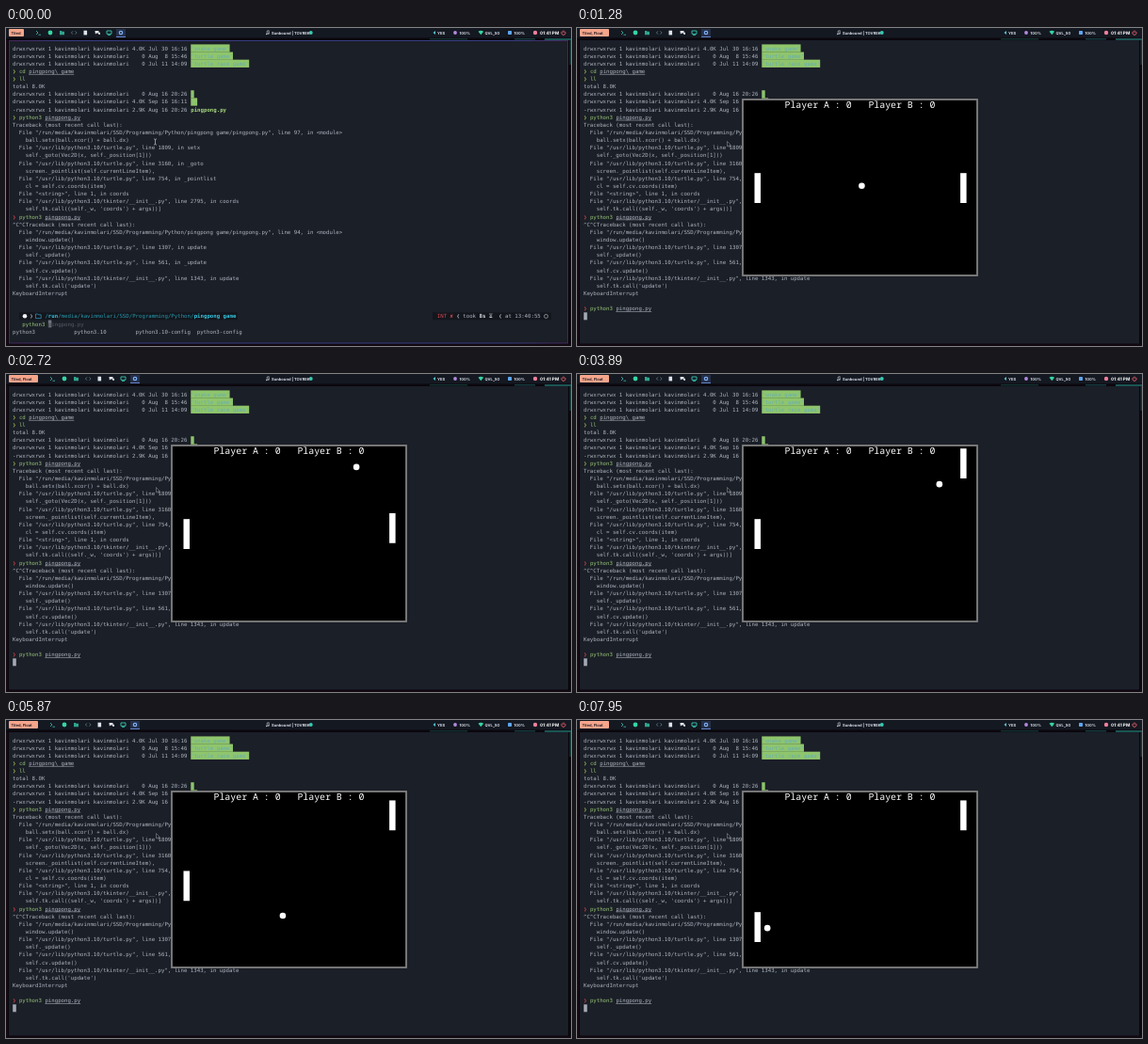
Write an HTML page that moves like this. It is 600x338 px and loops after 8 s.

```html
<!DOCTYPE html>
<html lang="en">
<head>
<meta charset="utf-8">
<title>Ping pong in a terminal</title>
<style>
html, body { margin: 0; width: 100%; height: 100%; overflow: hidden; background: #0a070d; }
svg { display: block; width: 600px; height: 338px; }
text { white-space: pre; text-rendering: geometricPrecision; font: 5.716px "DejaVu Sans Mono", monospace; }
.bar text { font: bold 4.1px Inter, sans-serif; fill: #d5dbe6; }
.bar .clock { font-size: 4.7px; fill: #fff; }
.score { font: 9.9px "Noto Sans Mono", "DejaVu Sans Mono", monospace; fill: #fff; }
.bold { font-weight: bold; }
.under { text-decoration: underline; }
</style>
</head>
<body>
<svg id="stage" viewBox="0 0 600 338" xmlns="http://www.w3.org/2000/svg">
  <linearGradient id="focusRing">
    <stop offset="0" stop-color="#44265a"/>
    <stop offset=".1" stop-color="#383e82"/>
    <stop offset=".9" stop-color="#383e82"/>
    <stop offset="1" stop-color="#44265a"/>
  </linearGradient>
  <rect width="600" height="338" fill="#0a070d"/>
  <g id="wallpaper"></g>
  <rect width="600" height="10.5" fill="#141821"/>
  <g class="bar">
    <rect id="pill" x="3" y="1" height="8" rx="1" fill="#f5a58c"/>
    <text id="layout" x="5.500" y="6.600" style="fill:#33252a"></text>
    <g id="icons" fill="none" stroke-width=".9">
      <path d="M32 3l2 2-2 2M34.500 7.200h2.500" stroke="#3fae9f"/>
      <circle cx="47" cy="5" r="2.400" fill="#35d6a4"/>
      <path d="M57 3h2l.7.8h2.300v3.400h-5z" fill="#2fa58e"/>
      <path d="M71 3.300l-1.600 1.700 1.600 1.700M73.500 3.300l1.600 1.700-1.600 1.700" stroke="#59737b"/>
      <path d="M82.500 2.700h3.600v4.700h-3.600z" fill="#dfe5ec"/>
      <path d="M94.500 3h4v2.600h-2.400l-1.200 1z M98 4.700h2v2.200l-2-.4z" fill="#e6ebf2"/>
      <path d="M107 3h5v3.300h-5zM108 7.400h3" stroke="#38c9b1"/>
      <rect x="117" y="1" width="10" height="8" fill="#25304a"/>
      <path d="M117 9.500h10" stroke="#6c8fe0"/>
      <circle cx="122" cy="5" r="1.700" stroke="#7fb2f5" stroke-width="1.200"/>
    </g>
    <path d="M277.200 6.600v-3.400l2-.5v3.300" fill="none" stroke="#d5dbe6" stroke-width=".6"/>
    <circle cx="276.800" cy="6.500" r=".7" fill="#d5dbe6"/>
    <circle cx="278.800" cy="6" r=".7" fill="#d5dbe6"/>
    <text x="282" y="6.600">Sunbound | TOVREK</text>
    <circle cx="323.800" cy="5" r="1.900" fill="#36cdb5"/>
    <path d="M456 3v4l-2.500-2z" fill="#52c5d0"/>
    <text x="458" y="6.600">YES</text>
    <circle cx="477" cy="5" r="1.900" fill="#b48ae0"/>
    <text x="481.500" y="6.600">100%</text>
    <path d="M501.500 3.700q2.800-2 5.600 0l-2.800 3.500z" fill="#35d6a4"/>
    <text x="508.500" y="6.600">QVL_5G</text>
    <rect x="533" y="3" width="4" height="4" rx=".7" fill="#5ea6ef"/>
    <text x="539.500" y="6.600">100%</text>
    <circle cx="562" cy="5" r="2.200" fill="#ef7f9b"/>
    <text class="clock" x="567" y="6.700">01:41 PM</text>
    <path d="M590.700 3.600a2.100 2.100 0 1 0 2.600 0M592 2.500v2.500" fill="none" stroke="#f0626f" stroke-width=".9"/>
  </g>
  <rect id="terminal" x="3.500" y="13.500" width="593" height="321.500" fill="#1b1f27"/>
  <g id="history"></g>
  <g id="prompt">
    <path d="M14 302.300h232v8h-232zM453 302.300h126v8h-126z" fill="#13161d"/>
    <circle cx="20" cy="306.300" r="2.300" fill="#eef1f5"/>
    <path d="M31.500 304h2.300l.8.8h2.600v3.800h-5.700z" fill="none" stroke="#2f9fc4" stroke-width=".7"/>
    <rect id="inputCursor" y="310.500" width="3.500" height="7.800" fill="#6f747f"/>
  </g>
  <g id="completion"></g>
  <g id="accepted"></g>
  <g id="running"><rect x="7.200" y="302.300" width="3.600" height="8" fill="#a3a9b4"/></g>
  <path id="beam" d="M157 118h1l.5.500.5-.5h1M158.500 118.500v5M157 124h1l.5-.5.5.5h1" fill="none" stroke="#c3c7ce" stroke-width=".7"/>
  <path id="arrow" d="M159.500 120.500v5.500l1.300-1.100 1 2 .8-.4-.9-1.900h1.600z" fill="#15181e" stroke="#a0a5ad" stroke-width=".5"/>
  <g id="game">
    <rect x="176" y="76" width="249" height="187" fill="#000" stroke="#808080" stroke-width="1.800"/>
    <text class="score" x="220.500" y="85.300">Player A : 0   Player B : 0</text>
    <rect id="leftPaddle" x="188.500" width="6.500" height="31.800" fill="#fff"/>
    <rect id="rightPaddle" x="407.100" width="6.500" height="31.800" fill="#fff"/>
    <circle id="ball" r="3.300" fill="#fff"/>
  </g>
</svg>
<script>
const $ = id => document.getElementById(id);
const LOOP = 8000, FRAME = 160 / 3;
const CELL = 3.441, ROW = 8.14, LEFT = 7;
const GREY = '#adb4bf', GREEN = '#98c379', LIME = '#a2bd55', RED = '#d8434e';
const TEAL = '#2799ad', CYAN = '#35c3dc', WHITE = '#d8dde5';
const USER = 'kavinmolari';
const DIR = `/run/media/${USER}/SSD/Programming/Python/`;

function add(parent, tag, attrs, content = '') {
  const node = document.createElementNS('http://www.w3.org/2000/svg', tag);
  for (const key in attrs) node.setAttribute(key, attrs[key]);
  node.textContent = content;
  $(parent).append(node);
}

function write(parent, row, col, content, fill = GREY, style = '') {
  add(parent, 'text', { x: LEFT + col * CELL, y: 23.5 + row * ROW, fill, class: style }, content);
}

function command(parent, row, name, arg = '', color = LIME) {
  write(parent, row, 0, '❯', color);
  write(parent, row, 2, name, GREEN);
  if (arg) write(parent, row, 3 + name.length, arg, GREY, 'under');
}

function listing(row, mode, size, date, name, folder = true) {
  write('history', row, 0, `${mode} 1 ${USER} ${USER} ${size.padStart(4)} ${date}`);
  if (folder) add('history', 'rect', {
    x: LEFT + 55 * CELL, y: 17.4 + row * ROW, width: name.length * CELL, height: ROW + .1, fill: '#8fc56c'
  });
  write('history', row, 55, name, folder ? '#66adb5' : '#a5d67f', folder ? '' : 'bold');
}

const lib = (file, line, fn) => `  File "/usr/lib/python3.10/${file}", line ${line}, in ${fn}`;
const script = line => `  File "${DIR}pingpong game/pingpong.py", line ${line}, in <module>`;
const lines = (row, list) => list.forEach((line, i) => write('history', row + i, 0, line));

listing(0, 'drwxrwxrwx', '4.0K', 'Jul 30 16:16', "'snake game'");
listing(1, 'drwxrwxrwx', '0', 'Aug  8 15:46', "'turtle game'");
listing(2, 'drwxrwxrwx', '0', 'Jul 11 14:09', "'turtle race game'");
command('history', 3, 'cd', 'pingpong\\ game');
command('history', 4, 'll');
lines(5, ['total 8.0K']);
listing(6, 'drwxrwxrwx', '0', 'Aug 16 20:26', '.');
listing(7, 'drwxrwxrwx', '4.0K', 'Sep 16 16:11', '..');
listing(8, '-rwxrwxrwx', '2.9K', 'Aug 16 20:26', 'pingpong.py', false);
command('history', 9, 'python3', 'pingpong.py');
lines(10, [
  'Traceback (most recent call last):',
  script(97),
  '    ball.setx(ball.xcor() + ball.dx)',
  lib('turtle.py', 1809, 'setx'),
  '    self._goto(Vec2D(x, self._position[1]))',
  lib('turtle.py', 3160, '_goto'),
  '    screen._pointlist(self.currentLineItem),',
  lib('turtle.py', 754, '_pointlist'),
  '    cl = self.cv.coords(item)',
  '  File "<string>", line 1, in coords',
  lib('tkinter/__init__.py', 2795, 'coords'),
  "    self.tk.call((self._w, 'coords') + args))]"
]);
command('history', 22, 'python3', 'pingpong.py', RED);
lines(23, [
  '^C^CTraceback (most recent call last):',
  script(94),
  '    window.update()',
  lib('turtle.py', 1307, 'update'),
  '    self._update()',
  lib('turtle.py', 561, '_update'),
  '    self.cv.update()',
  lib('tkinter/__init__.py', 1343, 'update'),
  "    self.tk.call('update')",
  'KeyboardInterrupt'
]);

write('prompt', 35, 5.3, '❯');
write('prompt', 35, 10, '/', TEAL);
write('prompt', 35, 11, 'run', CYAN, 'bold');
write('prompt', 35, 14, DIR.slice(4), TEAL);
write('prompt', 35, 56, 'pingpong game', CYAN, 'bold');
write('prompt', 35, 131, 'INT ✘', RED);
write('prompt', 35, 137, '❮ took');
write('prompt', 35, 144, '8s', WHITE, 'bold');
write('prompt', 35, 147, '⏳', WHITE);
write('prompt', 35, 150, '❮ at 13:40:55');
add('prompt', 'circle', { cx: 573.5, cy: 306.4, r: 2, fill: 'none', stroke: GREY, 'stroke-width': .7 });
write('prompt', 36, 3, 'python3', GREEN);
write('completion', 36, 11, 'p', '#3b3f48');
write('completion', 36, 12, 'ingpong.py', '#565c67');
write('completion', 37, 0, 'python3            python3.10         python3.10-config  python3-config');
write('accepted', 36, 11, 'pingpong.py', GREY, 'under');
command('running', 34, 'python3', 'pingpong.py', RED);

// Slivers of wallpaper visible around the terminal window.
[[450, 11, 40, 1.5, '#12302f'], [540, 11, 22, 1.5, '#143c40'], [572, 11, 28, 2, '#1a5553'],
 [598.5, 13, 1.5, 26, '#123536'], [0, 13, 2, 323, '#170a13'], [0, 336, 600, 2, '#120910']]
  .forEach(([x, y, width, height, fill]) => add('wallpaper', 'rect', { x, y, width, height, fill }));

const ACCEPT = 400, ENTER = 800, OPEN = 1270;
const PADDLE_TOP = 154.2, STEP = 6.25;
const ballPath = [
  [1240, 300.5, 169.5], [1650, 320, 151], [3118, 391.5, 79.5], [3436, 407, 95], [3890, 385, 117],
  [4850, 340, 162], [6770, 253, 249], [7025, 242, 260], [7950, 202, 221]
];

function ballAt(t) {
  let i = 1;
  while (i < ballPath.length - 1 && ballPath[i][0] < t) i++;
  const [t0, x0, y0] = ballPath[i - 1], [t1, x1, y1] = ballPath[i];
  const k = (t - t0) / (t1 - t0);
  return [x0 + (x1 - x0) * k, y0 + (y1 - y0) * k];
}

// Steps made by a held key: one at once, then repeats after a delay.
function heldSteps(t, start, total) {
  if (t < start) return 0;
  const repeats = Math.floor((t - start - 500) / 40) + 1;
  return 1 + Math.max(0, Math.min(total - 1, repeats));
}
const taps = (t, times) => times.filter(time => t >= time).length;
const show = (id, on) => $(id).style.display = on ? '' : 'none';

function draw(t) {
  const playing = t >= OPEN;
  show('prompt', t < ENTER);
  show('completion', t < ACCEPT);
  show('accepted', t >= ACCEPT && t < ENTER);
  show('running', t >= ENTER);
  show('game', playing);
  show('arrow', playing);
  show('beam', !playing);
  $('inputCursor').setAttribute('x', LEFT + (t < ACCEPT ? 11 : 22) * CELL);
  $('layout').textContent = playing ? 'Tiled, Float' : 'Tiled';
  $('pill').setAttribute('width', playing ? 31 : 16);
  $('icons').setAttribute('transform', `translate(${playing ? 15 : 0})`);
  $('terminal').setAttribute('stroke', playing ? '#1a1e29' : 'url(#focusRing)');
  if (!playing) return;

  const left = heldSteps(t, 5800, 12) - taps(t, [7350, 7550, 7750, 7900]);
  const right = taps(t, [4100]) - heldSteps(t, 2300, 12);
  $('leftPaddle').setAttribute('y', PADDLE_TOP + left * STEP);
  $('rightPaddle').setAttribute('y', PADDLE_TOP + right * STEP);
  const [x, y] = ballAt(t);
  $('ball').setAttribute('cx', x);
  $('ball').setAttribute('cy', y);
}

function tick() {
  const t = performance.now() % LOOP;
  draw(Math.floor((t + 5) / FRAME) * FRAME % LOOP);
  requestAnimationFrame(tick);
}
tick();
</script>
</body>
</html>
```
